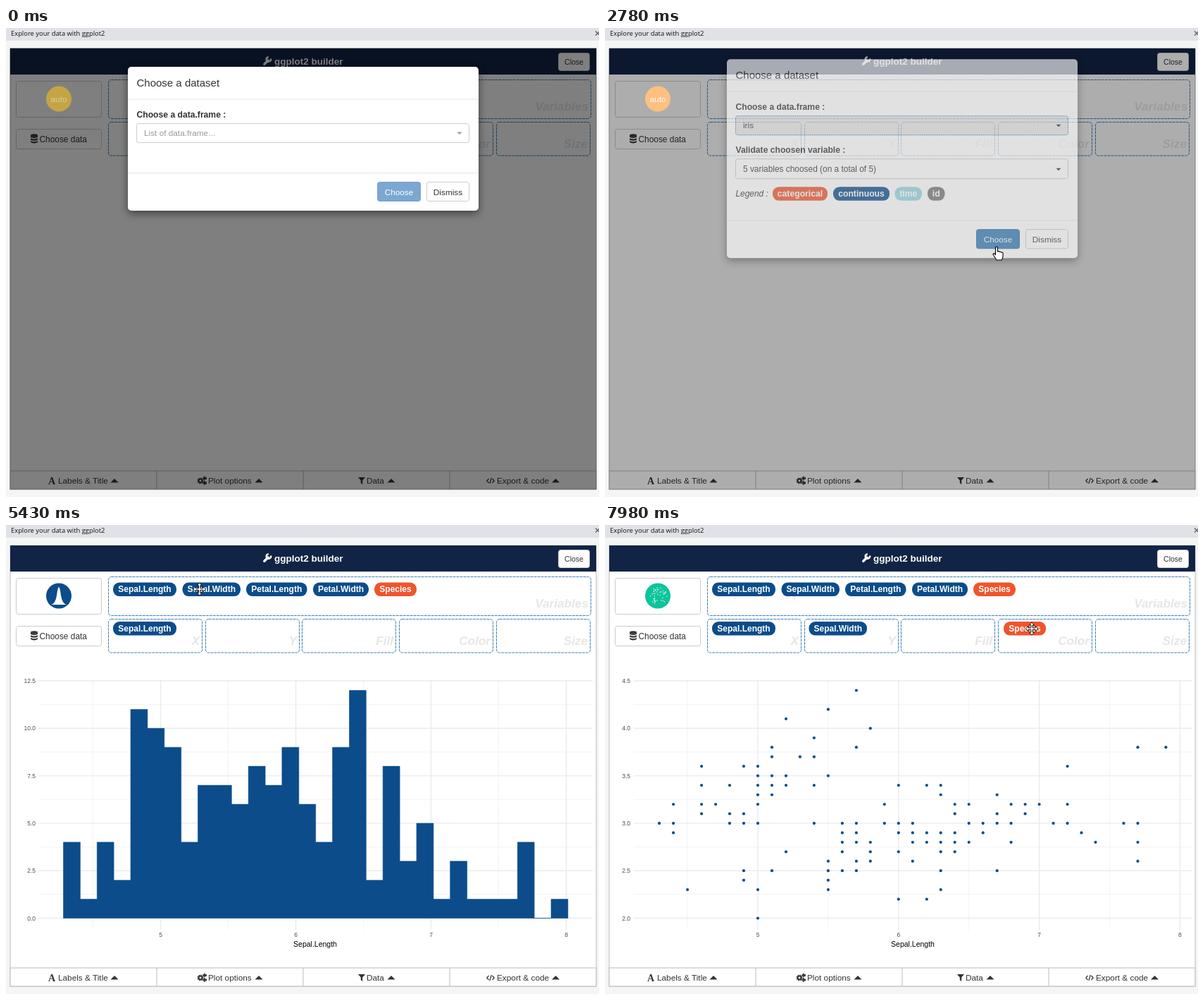
Write an HTML page that moves like this. It is 842x665 px and loops after 8 s.

```html
<!DOCTYPE html>
<html lang="en">
<head>
<meta charset="utf-8">
<title>Plot builder demo</title>
<style>
  html, body { margin: 0; width: 100%; height: 100%; overflow: hidden; background: #f4f5f5; }
  svg { display: block; width: 842px; height: 665px; font-family: "Liberation Sans", Arial, sans-serif; }
  .shadow { filter: drop-shadow(0 4px 6px rgba(0, 0, 0, .5)); }
</style>
</head>
<body>
<svg id="stage" viewBox="0 0 842 665"></svg>
<script>
const BLUE = '#0c4c8a', ORANGE = '#f0542d', INK = '#333', LOOP = 8000;

// Markup helpers
const rect = (x, y, w, h, fill, more = '') =>
  `<rect x="${x}" y="${y}" width="${w}" height="${h}" fill="${fill}" ${more}/>`;
const text = (x, y, str, size = 11.8, fill = INK, more = '') =>
  `<text x="${x}" y="${y}" font-size="${size}" fill="${fill}" ${more}>${str}</text>`;
const line = (x1, y1, x2, y2, stroke = '#e5e5e5', width = 1) =>
  `<path d="M${x1} ${y1}L${x2} ${y2}" stroke="${stroke}" stroke-width="${width}"/>`;
const group = (id, body, more = '') => `<g id="${id}" ${more}>${body}</g>`;
const hidden = (id, body, more = '') => group(id, body, `display="none" ${more}`);
const BOLD = 'font-weight="bold"', MID = 'text-anchor="middle"', END = 'text-anchor="end"';

const box = (x, y, w, h, fill = '#fff', stroke = '#ccc') =>
  rect(x + .5, y + .5, w - 1, h - 1, fill, `rx="3" stroke="${stroke}"`);
const dashed = (x, y, w, h, label) =>
  rect(x + .5, y + .5, w - 1, h - 1, '#fff', 'rx="4" stroke="#3f82b9" stroke-dasharray="4 1"') +
  text(x + w - 4, y + h - 12, label, 17.2, '#e6e6e6', `${BOLD} font-style="italic" ${END}`);
const pill = (x, y, w, label, fill = BLUE, size = 12) =>
  rect(x, y, w, 19.6, fill, 'rx="9"') +
  text(x + w / 2, y + 13.8, label, size, '#fff', `${BOLD} ${MID}`);
const caretDown = (x, y, fill) => `<path d="M${x - 3.5} ${y}h7l-3.5 3.6z" fill="${fill}"/>`;
const caretUp = x => `<path d="M${x - 5.5} 644.5h11l-5.5-5.5z" fill="${INK}"/>`;

const vars = [
  { name: 'Sepal.Length', x: 152, w: 90 },
  { name: 'Sepal.Width', x: 250.5, w: 82.5 },
  { name: 'Petal.Length', x: 341, w: 86.5 },
  { name: 'Petal.Width', x: 436, w: 79 },
  { name: 'Species', x: 523, w: 60, fill: ORANGE }
];
const varPill = (i, x = vars[i].x, y = 81.5) => pill(x, y, vars[i].w, vars[i].name, vars[i].fill);

// Icons
const wrench = `<g fill="none" stroke="#fff"><path d="M366.8 51.2L372 46" stroke-width="3.4" stroke-linecap="round"/>
  <path d="M376 43.5a3.2 3.2 0 1 1-3.2-2.3" stroke-width="2.6"/></g>`;
const database = [152.5, 156.2, 159.9].map(y =>
  `<path d="M35 ${y}q5 2.6 10 0v2.2q-5 2.8-10 0z" fill="${INK}"/>`).join('') +
  `<ellipse cx="40" cy="152" rx="5" ry="1.8" fill="${INK}"/>`;
const cog = (x, y, r) => `<circle cx="${x}" cy="${y}" r="${r}" fill="none" stroke="${INK}" stroke-width="2"/>
  <circle cx="${x}" cy="${y}" r="${r + 1.4}" fill="none" stroke="${INK}" stroke-width="1.3" stroke-dasharray="1.6 1.4"/>`;
const filter = `<path d="M500 637h10l-3.8 4.6v5.4l-2.4-1.8v-3.6z" fill="${INK}"/>`;

const icons = () => {
  const disc = fill => `<circle cx="75" cy="100.5" r="18" fill="${fill}"/>`;
  let seed = 7, dots = '';
  const rnd = () => (seed = seed * 16807 % 2147483647) / 2147483647;
  for (let i = 0; i < 42; i++) {
    const a = rnd() * 6.283, r = 13 * Math.sqrt(rnd());
    dots += rect((75 + r * Math.cos(a)).toFixed(1), (100.5 + r * Math.sin(a)).toFixed(1), 1.2, 1.2, '#fff');
  }
  return group('autoIcon', `<circle id="autoDisc" cx="75" cy="100.5" r="18"/>` +
      text(75, 104.5, 'auto', 11.8, '#fff', `id="autoText" ${MID}`)) +
    hidden('histIcon', disc(BLUE) +
      '<path d="M64 113q6-1 8-13q1.500-12 3-12t3 12q2 12 8 13z" fill="#fff"/>') +
    hidden('dotIcon', disc('#0cc49b') + dots);
};

// Plots
const grid = (left, xs, xMinor, yLabels, labelEnd, title) => {
  let out = '';
  xMinor.forEach(x => out += line(x, 219, x, 574, '#f3f3f3'));
  for (let i = 0; i < 5; i++) out += line(left, 254.6 + i * 67.3, 833, 254.6 + i * 67.3, '#f3f3f3');
  xs.forEach((x, i) => out += line(x, 219, x, 574, '#ebebeb', 1.4) +
    text(x, 584, 5 + i, 8.5, '#4d4d4d', MID));
  yLabels.forEach((label, i) => {
    const y = 557.5 - i * 67.3;
    out += line(left, y, 833, y, '#ebebeb', 1.4) + text(labelEnd, y + 3, label, 8.5, '#4d4d4d', END);
  });
  return out + text(title, 597.5, 'Sepal.Length', 10.5, '#000', MID);
};
const steps = (start, gap) => [0, 1, 2, 3].map(i => start + i * gap);

const counts = [4, 1, 4, 2, 11, 10, 9, 4, 7, 7, 6, 8, 7, 9, 6, 4, 9, 12, 2, 8, 3, 5, 1, 3, 1, 1, 1, 4, 0, 1];
const histogram = () => {
  const bin = 23.88, outline = counts.map((n, i) =>
    `V${(557.5 - n * 26.92).toFixed(1)}H${(81.5 + (i + 1) * bin).toFixed(1)}`).join('');
  return grid(46, steps(219.5, 192), steps(123.5, 192), ['0.0', '2.5', '5.0', '7.5', '10.0', '12.5'], 42, 439) +
    `<path d="M81.5 557.5${outline}V557.5z" fill="${BLUE}" stroke="${BLUE}" stroke-width=".6"/>`;
};

// Sepal width to sepal lengths, both in millimetres
const iris = {
  20: [50], 22: [60, 62], 23: [45, 50, 55, 63], 24: [49, 55], 25: [49, 51, 55, 56, 57, 63, 67],
  26: [55, 57, 58, 61, 77], 27: [52, 56, 58, 60, 63, 64],
  28: [56, 57, 58, 61, 62, 63, 64, 65, 68, 74, 77], 29: [44, 56, 57, 60, 61, 62, 63, 64, 66, 73],
  30: [43, 44, 48, 49, 50, 54, 56, 57, 59, 60, 61, 65, 66, 67, 68, 71, 72, 76, 77],
  31: [46, 48, 49, 64, 67, 69], 32: [44, 46, 47, 50, 59, 64, 65, 68, 69, 70, 72],
  33: [50, 51, 63, 67], 34: [46, 48, 50, 51, 52, 54, 60, 62, 63], 35: [50, 51, 52, 55],
  36: [46, 49, 50, 72], 37: [51, 53, 54], 38: [51, 57, 77, 79],
  39: [54], 40: [58], 41: [52], 42: [55], 44: [57]
};
const scatter = () => {
  let out = grid(41, steps(217, 199.8), steps(117, 199.8), ['2.0', '2.5', '3.0', '3.5', '4.0', '4.5'], 36, 437);
  for (const w in iris) for (const l of iris[w])
    out += `<circle cx="${(217 + (l - 50) * 19.98).toFixed(1)}" cy="${(557.5 - (w - 20) * 13.46).toFixed(1)}" r="2.1" fill="${BLUE}"/>`;
  return out;
};

// Page sections
const page = () => rect(0, 0, 842, 665, '#f4f5f5') + rect(0, 0, 842, 18, '#e0e2e7') +
  text(7, 11, 'Explore your data with ggplot2', 9.4, '#111', 'font-family="Open Sans, sans-serif"') +
  `<path d="M837 4.500l6 6m0-6l-6 6" stroke="#666" stroke-width="1.5"/>` +
  rect(6, 29, 832, 625, '#fff', 'stroke="#bbb"') + rect(6, 29, 832, 37, '#112446') + wrench +
  text(381, 51.5, 'ggplot2 builder', 13.5, '#fff', BOLD) +
  box(784, 35, 45, 26) + text(806.5, 52, 'Close', 10.5, INK, MID) +
  box(14, 75, 122, 52) + box(14, 143, 122, 29) + database + text(47.5, 161.5, 'Choose data', 11.9) +
  dashed(145, 73, 686, 56, 'Variables') +
  ['X', 'Y', 'Fill', 'Color', 'Size'].map((s, i) => dashed(145 + Math.round(i * 137.7), 133, 134, 48.500, s)).join('') +
  rect(6, 628, 832, 26, '#fff', 'stroke="#bbb"') + [214, 422, 630].map(x => line(x, 628, x, 654, '#bbb')).join('') +
  text(60, 646.5, 'A', 14, INK, `${BOLD} font-family="Liberation Serif, serif"`) +
  text(74, 646, 'Labels &amp; Title') + caretUp(154) +
  cog(276, 642, 2.4) + cog(282, 638.5, 1) + cog(282, 645, 1) + text(287, 646, 'Plot options') + caretUp(359) +
  filter + text(512, 646, 'Data') + caretUp(547) +
  `<path d="M685.500 639l-2.700 3 2.700 3m5-6l2.700 3-2.700 3m-1.200-7l-2.400 8" fill="none" stroke="${INK}" stroke-width="1.2"/>` +
  text(697, 646, 'Export &amp; code') + caretUp(780.5);

const select = () =>
  `<rect id="selBox" x="185.5" y="135.5" width="472" height="27" rx="3"/>` +
  text(196, 153, '', 11.8, INK, 'id="selText"') + group('selCaret', caretDown(644, 147.5, 'currentColor'));

const modal = () => rect(173, 55, 498, 204, '#fff', 'id="panel" rx="5" class="shadow"') +
  text(185.5, 83, 'Choose a dataset', 15) + line(173, 101, 671, 101) +
  text(185.5, 126.5, 'Choose a data.frame :', 12.15, INK, BOLD) + select() +
  hidden('validate', text(185.5, 188, 'Validate choosen variable :', 12.15, INK, BOLD) +
    `<rect id="varBox" x="185.5" y="196.5" width="472" height="28" rx="3"/>` +
    text(196, 215, '5 variables choosed (on a total of 5)', 11.9) + caretDown(644, 209.5, INK) +
    text(185.5, 250, 'Legend :', 11.9, INK, 'font-style="italic"') +
    pill(238, 236, 78, 'categorical', ORANGE, 12.2) + pill(324, 236, 80, 'continuous', BLUE, 12.2) +
    pill(411.500, 236, 38.500, 'time', '#97d5e0', 12.2) + pill(458, 236, 24.500, 'id', '#757575', 12.2)) +
  group('foot', line(173, 205.5, 671, 205.5) +
    `<rect id="okBox" x="527.5" y="218.5" width="61" height="27" rx="3"/>` +
    text(558, 236.5, 'Choose', 11.8, '#fff', MID) + box(597, 218, 61, 28) + text(627.500, 236.5, 'Dismiss', 11.8, INK, MID)) +
  hidden('dataMenu', box(185, 164, 474, 28) + rect(186, 168, 472, 20, '#f0f0f0') + text(196, 182, 'iris')) +
  hidden('varMenu', box(185, 226, 474, 196) + box(191, 232, 231, 25) + box(422, 232, 231, 25) +
    text(306, 248.5, 'Select All', 10.5, INK, MID) + text(537, 248.5, 'Deselect All', 10.5, INK, MID) +
    vars.map((v, i) => pill(196, 264 + i * 31, v.w, v.name, v.fill) +
      `<path d="M638 ${274 + i * 31}l3 3 6-7" fill="none" stroke="${INK}" stroke-width="2"/>`).join(''));

const cursorShapes = {
  arrow: 'M0 0V13.500L3.200 10.600 5.300 15.700 7.500 14.700 5.400 9.800H9.700Z',
  hand: 'M-1.500 1.200q1.500-2 3 0V7q2-1 2.600.6 2-.8 2.600.6 2.200-.6 2.400 1.200V13q0 3-2 6H0Q-2 16-4.500 12q-1-2 .6-2.400 1.400 0 2.400 1.900Z',
  move: 'M0-9l3.500 3.800H1.200V-1.200H5.200V-3.500L9 0 5.200 3.500V1.200H1.200V5.200H3.500L0 9-3.500 5.200H-1.200V1.200H-5.200V3.500L-9 0-5.200-3.500V-1.200H-1.200V-5.200H-3.500Z'
};

const stage = document.getElementById('stage');
stage.innerHTML = page() +
  hidden('pills', vars.map((v, i) => varPill(i)).join('')) +
  hidden('slotX', varPill(0, 152, 137)) + hidden('slotY', varPill(1, 289.5, 137)) +
  hidden('slotColor', varPill(4, 566, 137)) +
  hidden('hist', histogram()) + hidden('dots', scatter()) +
  rect(5.5, 28.5, 833, 626, '#000', 'id="shade"') + icons() + group('modal', modal()) +
  [0, 1, 4].map(i => hidden('drag' + i, varPill(i), 'opacity=".8"')).join('') +
  hidden('cursor', '<path id="cursorPath" stroke="#000" stroke-linejoin="round" fill="#fff"/>');

const el = {};
stage.querySelectorAll('[id]').forEach(node => el[node.id] = node);
const set = (id, attrs) => { for (const k in attrs) el[id].setAttribute(k, attrs[k]); };
const show = (id, on) => set(id, { display: on ? 'inline' : 'none' });

// Pointer track: time, x, y, shape from then on
const track = [
  [70, 663, 600, 'arrow'], [680, 497, 158, 'hand'], [760, 491, 150, 'hand'], [1060, 491, 150, 'hand'],
  [1285, 489, 182, 'hand'], [1760, 489, 182, 'hand'], [1900, 557, 204, 'hand'], [2150, 557, 204, 'hand'],
  [2285, 556, 310, 'hand'], [2780, 556, 310, 'arrow'], [3165, 556, 310, 'arrow'], [3880, 222, 87, 'move'],
  [3960, 219, 82, 'move'], [4190, 221, 84, 'move'], [4340, 221, 84, 'move'], [4415, 222, 122, 'arrow'],
  [4570, 231, 142, 'arrow'], [4800, 231, 142, 'move'], [5040, 265, 92, 'move'], [5280, 274, 91, 'move'],
  [5480, 275, 91, 'move'], [5560, 277, 96, 'arrow'], [5715, 313, 136, 'move'], [5785, 323, 143, 'move'],
  [5860, 323, 143, 'move'], [5940, 326, 145, 'move'], [6340, 326, 145, 'arrow'], [6590, 540, 93, 'move'],
  [6660, 550, 89, 'move'], [7200, 550, 89, 'arrow'], [7540, 590, 138, 'move'], [7740, 605, 147, 'move'],
  [7890, 606, 147, 'move']
];
const easeInOut = p => p * p * (3 - 2 * p);
const pointerAt = t => {
  let i = 0;
  while (i < track.length - 1 && track[i + 1][0] <= t) i++;
  const a = track[i], b = track[i + 1] || a;
  const p = b === a ? 0 : (t - a[0]) / (b[0] - a[0]);
  const e = b[0] - a[0] > 300 ? easeInOut(p) : p;
  return { x: a[1] + (b[1] - a[1]) * e, y: a[2] + (b[2] - a[2]) * e, shape: a[3] };
};

// Dragged copies: variable, start, end, grab point
const drags = [[0, 4420, 4800, 220, 84], [1, 5560, 6120, 274.5, 89.5], [4, 7210, 7900, 550, 89]];
// A pale placeholder appears in the slot before the drop
const slots = [['slotX', 4490, 4800], ['slotY', 5730, 6120], ['slotColor', 7560, 7900]];

function draw(t) {
  const between = (a, b) => t >= a && t < b;
  const ptr = pointerAt(Math.floor((t + 9) / 76.2) * 76.2);
  show('cursor', t >= 70);
  set('cursor', { transform: `translate(${ptr.x.toFixed(1)} ${ptr.y.toFixed(1)})` });
  set('cursorPath', { d: cursorShapes[ptr.shape], 'stroke-width': ptr.shape === 'move' ? .9 : 1.1 });

  const open = t < 2780, chosen = t >= 1610, tall = t >= 1760, grow = tall ? 78 : 0;
  const fade = open ? 1 : Math.max(0, 1 - (t - 2700) / 225);
  set('modal', { opacity: fade, transform: `translate(0 ${-30 * (1 - fade)})` });
  set('shade', { opacity: fade / 2 });
  show('modal', fade > 0);
  set('panel', { height: 204 + grow });
  set('foot', { transform: `translate(0 ${grow})` });
  set('okBox', tall ? { fill: '#337ab7', stroke: '#2e6da4' } : { fill: '#7aa8d1', stroke: '#76a2ca' });

  const pressed = between(990, 1610), focus = t >= 990;
  set('selBox', {
    fill: pressed ? '#d0d0d0' : t >= 685 ? '#e6e6e6' : '#fff',
    stroke: focus ? '#3b8bd0' : t >= 685 ? '#adadad' : '#ccc',
    'stroke-dasharray': focus ? '2 1' : 'none'
  });
  el.selText.textContent = chosen ? 'iris' : 'List of data.frame...';
  set('selText', { fill: chosen ? INK : '#999' });
  set('selCaret', { color: chosen ? INK : '#999' });
  show('dataMenu', between(1065, 1610));
  show('validate', tall);
  set('varBox', between(1840, 2220) ? { fill: '#e6e6e6', stroke: '#adadad' } : { fill: '#fff', stroke: '#ccc' });
  show('varMenu', between(2000, 2220));

  set('autoDisc', { fill: open ? '#c4a546' : '#fdc07f' });
  set('autoText', { fill: open ? '#dfcc96' : '#fff' });
  show('autoIcon', t < 5430);
  show('histIcon', between(5430, 6350));
  show('dotIcon', t >= 6350);
  show('hist', between(5430, 6350));
  show('dots', t >= 6350);
  show('pills', t >= 3170);

  for (const [id, start, drop] of slots) {
    show(id, t >= start);
    set(id, { opacity: t < drop ? .22 : 1 });
  }
  for (const [i, start, end, gx, gy] of drags) {
    show('drag' + i, between(start, end));
    // The first copy trails behind the pointer as it is picked up
    const dy = i === 0 && t < 4490 ? 5 : ptr.y - gy, dx = i === 0 && t < 4490 ? 0 : ptr.x - gx;
    set('drag' + i, { transform: `translate(${dx.toFixed(1)} ${dy.toFixed(1)})` });
  }
}

const began = performance.now();
const tick = () => {
  draw((performance.now() - began) % LOOP);
  requestAnimationFrame(tick);
};
tick();
</script>
</body>
</html>
```
